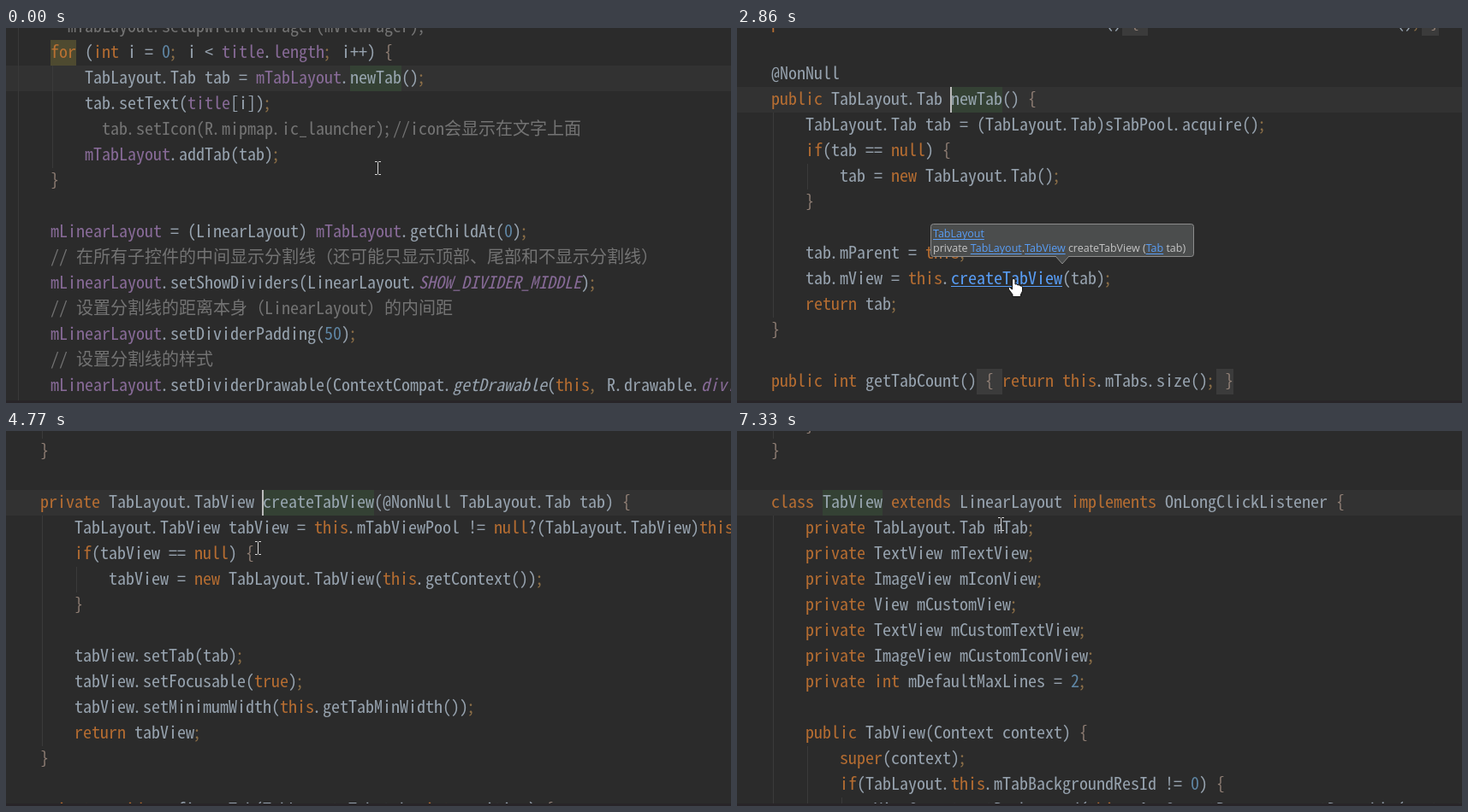
Animation of 847 by 439 pixels, one loop 7420 ms. Source, as an HTML page with a canvas:

```html
<!DOCTYPE html>
<html lang="en">
<head>
<meta charset="utf-8">
<title>Code walk</title>
<style>
html, body { margin: 0; width: 100%; height: 100%; overflow: hidden; background: #2b2b2b; }
canvas { display: block; }
</style>
</head>
<body>
<canvas id="stage" width="847" height="439"></canvas>
<script>
const W = 847, H = 439, LOOP = 7420, ROW = 30, COL = 10;
const g = document.getElementById('stage').getContext('2d');

const BG = '#2b2b2b', BAND = '#323232', MATCH = '#344134', TEXT = '#a9b7c6', LINK = '#589df6';
const MONO = '"Noto Sans Mono CJK SC", "Liberation Mono", monospace';
const CJK = '20px "Noto Sans Mono CJK SC", "Noto Sans CJK SC", sans-serif';
const UI = '12.5px "Open Sans", "Noto Sans", sans-serif';

// Font size whose character advance is one column
g.font = '100px ' + MONO;
const CODE = 100 * COL / g.measureText('0').width + 'px ' + MONO;

// A leading ~ marks a line that is commented out
const setup = `~  mTabLayout.setupWithViewPager(mViewPager);
for (int i = 0; i < title.length; i++) {
    TabLayout.Tab tab = mTabLayout.newTab();
    tab.setText(title[i]);
~      tab.setIcon(R.mipmap.ic_launcher);//icon会显示在文字上面
    mTabLayout.addTab(tab);
}

mLinearLayout = (LinearLayout) mTabLayout.getChildAt(0);
// 在所有子控件的中间显示分割线（还可能只显示顶部、尾部和不显示分割线）
mLinearLayout.setShowDividers(LinearLayout.SHOW_DIVIDER_MIDDLE);
// 设置分割线的距离本身（LinearLayout）的内间距
mLinearLayout.setDividerPadding(50);
// 设置分割线的样式
mLinearLayout.setDividerDrawable(ContextCompat.getDrawable(this, R.drawable.divider));`;

const newTab = `}

public void removeOnTabSelectedListener(@NonNull TabLayout.OnTabSelectedListener listener) {
    this.mSelectedListeners.remove(listener);
}

public void clearOnTabSelectedListeners() { this.mSelectedListeners.clear(); }

@NonNull
public TabLayout.Tab newTab() {
    TabLayout.Tab tab = (TabLayout.Tab)sTabPool.acquire();
    if(tab == null) {
        tab = new TabLayout.Tab();
    }

    tab.mParent = this;
    tab.mView = this.createTabView(tab);
    return tab;
}

public int getTabCount() { return this.mTabs.size(); }
`;

const createView = `private void updateAllTabs() {
    int i = 0;

    for(int z = this.mTabs.size(); i < z; ++i) {
        ((TabLayout.Tab)this.mTabs.get(i)).updateView();
    }

}

private TabLayout.TabView createTabView(@NonNull TabLayout.Tab tab) {
    TabLayout.TabView tabView = this.mTabViewPool != null?(TabLayout.TabView)this.mTabViewPool.acquire():null;
    if(tabView == null) {
        tabView = new TabLayout.TabView(this.getContext());
    }

    tabView.setTab(tab);
    tabView.setFocusable(true);
    tabView.setMinimumWidth(this.getTabMinWidth());
    return tabView;
}

private void configureTab(TabLayout.Tab tab, int position) {`;

const tabView = `    public void draw(Canvas canvas) {
        super.draw(canvas);
        if(this.mIndicatorLeft >= 0 && this.mIndicatorRight > this.mIndicatorLeft) {
            canvas.drawRect((float)this.mIndicatorLeft, (float)(this.getHeight() - this.mSelectedIndicatorHeight),
        }

    }
}

class TabView extends LinearLayout implements OnLongClickListener {
    private TabLayout.Tab mTab;
    private TextView mTextView;
    private ImageView mIconView;
    private View mCustomView;
    private TextView mCustomTextView;
    private ImageView mCustomIconView;
    private int mDefaultMaxLines = 2;

    public TabView(Context context) {
        super(context);
        if(TabLayout.this.mTabBackgroundResId != 0) {
            ViewCompat.setBackground(this, AppCompatResources.getDrawable(context, TabLayout.this.mTab));`;

// row/col: caret position; len: highlighted name; scroll: times of 90px wheel notches
const pages = [
  { from: 0, code: setup, x: 52, y: -1, row: 2, col: 35, len: 6, scroll: [], fields: true },
  { from: 990, code: newTab, x: 40, y: -6, row: 9, col: 21, len: 6, scroll: [1940, 2090] },
  { from: 3250, code: createView, x: 40, y: -6, row: 9, col: 26, len: 13, scroll: [4050, 4120] },
  { from: 5770, code: tabView, x: 40, y: -6, row: 9, col: 6, len: 7, scroll: [6300, 6420], matchFrom: 6300 },
];
for (const p of pages) {
  p.lines = p.code.split('\n');
  p.indents = p.lines.map(s => s.trim() ? s.replace('~', '').search(/\S/) : -1);
}

const links = [
  { on: [690, 990], row: 2, col: 35, name: 'newTab', bg: MATCH },
  { on: [2790, 3250], row: 16, col: 21, name: 'createTabView', bg: BG },
  { on: [4990, 5770], row: 9, col: 18, name: 'TabView', bg: BAND },
];

// *text* is a link
const tips = [
  { on: [2860, 3090], x: 226, y: 229, w: 308, lines: [
    '*TabLayout*', 'private *TabLayout*.*TabView* createTabView (*Tab* tab)'] },
  { on: [5050, 5770], x: 93, y: 2, w: 375, lines: [
    '[design-26.1.0] *android.support.design.widget.TabLayout*',
    'class *TabView* extends *LinearLayout*', 'implements *OnLongClickListener*'] },
];

// Pointer moves: start, end, x, y
const START = [434, 164];
const moves = [
  [160, 690, 432, 60], [1450, 1870, 482, 195], [2260, 2300, 478, 195], [2410, 2790, 324, 294],
  [3800, 3900, 370, 265], [4450, 4770, 294, 137], [4820, 4990, 258, 82], [6460, 6500, 308, 109],
];
const handOn = [[690, 990], [2790, 3330], [4990, 5600]];
const pointerOff = [[6550, 7330]];
const caretOff = [[0, 340], [840, 990], [1450, 1940], [2410, 2860], [4450, 4750],
  [5050, 5520], [6300, 6550], [7020, LOOP]];

const within = (t, [a, b]) => t >= a && t < b;
const any = (t, spans) => spans.some(s => within(t, s));

function rect(x, y, w, h, color) {
  g.fillStyle = color;
  g.fillRect(x, y, w, h);
}

function text(s, x, y, color, font) {
  g.font = font;
  g.fillStyle = color;
  g.fillText(s, x, y);
}

const keyword = /^(for|int|public|private|void|if|null|new|this|return|class|extends|implements|super|float|true)$/;

function tokenStyle(s, fields) {
  if (keyword.test(s)) return ['#cc7832'];
  if (/^\d+$/.test(s)) return ['#6897bb'];
  if (/[;,]/.test(s)) return ['#9c7a4c'];
  if (/[{}]/.test(s)) return ['#a08c80'];
  if (fields) {
    if (/^(SHOW_\w+|divider)$/.test(s)) return ['#9876aa', 'italic '];
    if (s === 'getDrawable') return [TEXT, 'italic '];
    if (/^(m[A-Z]\w*|title|length)$/.test(s)) return ['#9876aa'];
  }
  return [TEXT];
}

function drawLine(line, x, y, fields) {
  let dim = line[0] === '~', col = 0;
  // Softened to look like thin strokes
  g.globalAlpha = 0.85;
  for (const [s] of line.replace('~', '').matchAll(/[\u3000-\uffef]+|\w+|\s+|\/\/|\S/g)) {
    const wide = s > '\u3000';
    if (s === '//') dim = true;
    const [color, slant = ''] = dim ? ['#808080'] : tokenStyle(s, fields);
    // Points and commas sit at the left of their cell
    const nudge = /^[.,;]$/.test(s) ? -2 : 0;
    if (s.trim()) text(s, x + col * COL + nudge, y + 6, color, wide ? CJK : slant + CODE);
    col += s.length * (wide ? 2 : 1);
  }
  g.globalAlpha = 1;
}

function drawFolds(line, x, y) {
  const m = line.match(/^(.*\)) \{ .*; \}$/);
  if (!m) return;
  rect(x + m[1].length * COL, y - 15, 30, ROW, '#3b3b3b');
  rect(x + (line.length - 2) * COL, y - 15, 20, ROW, '#3b3b3b');
}

function drawPage(p, t) {
  const shift = 90 * p.scroll.filter(s => t >= s).length;
  const yOf = row => p.y + row * ROW - shift;
  const caretX = p.x + p.col * COL, caretY = yOf(p.row) - 15;

  rect(0, caretY, W, ROW, BAND);
  if (t >= (p.matchFrom || 0)) rect(caretX, caretY, p.len * COL, ROW, MATCH);
  if (p.fields) {
    rect(p.x, yOf(1) - 15, 30, ROW, '#4e4a30');
    rect(14, 0, 1, H, '#393939');
  }
  p.lines.forEach((line, i) => {
    const y = yOf(i);
    let depth = p.indents[i];
    if (depth < 0) depth = Math.max(p.indents[i - 1] ?? 0, p.indents[i + 1] ?? 0);
    for (let c = 0; c + 4 <= depth; c += 4) rect(p.x + c * COL + 2, y - 15, 1, ROW, '#3a3a3a');
    drawFolds(line, p.x, y);
    drawLine(line, p.x, y, p.fields);
  });
  for (const l of links) {
    if (!within(t, l.on)) continue;
    const x = p.x + l.col * COL, y = yOf(l.row), w = l.name.length * COL;
    rect(x, y - 14, w, 28, l.bg);
    text(l.name, x, y + 6, LINK, CODE);
    rect(x, y + 8, w, 1, LINK);
  }
  if (!any(t, caretOff)) rect(caretX - 1, caretY, 2, ROW, '#bbbbbb');
}

function drawTip({ x, y, w, lines }) {
  const h = 5 + 17 * lines.length, mid = x + w / 2;
  g.beginPath();
  g.roundRect(x + 0.5, y + 0.5, w - 1, h - 1, 3);
  g.fillStyle = '#4b4d4d';
  g.strokeStyle = '#8c8c8c';
  g.lineWidth = 1;
  g.fill();
  g.stroke();
  g.beginPath();
  g.moveTo(mid - 8, y + h - 1);
  g.lineTo(mid, y + h + 8);
  g.lineTo(mid + 8, y + h - 1);
  g.fill();
  g.stroke();
  lines.forEach((line, i) => {
    let tx = x + 3;
    const ty = y + 16 + 17 * i;
    line.split('*').forEach((s, k) => {
      text(s, tx, ty, k % 2 ? LINK : '#c4c4c4', UI);
      const tw = g.measureText(s).width;
      if (k % 2) rect(tx, ty + 2, tw, 1, LINK);
      tx += tw;
    });
  });
}

function pointer(t) {
  let [x, y] = START;
  for (const [a, b, nx, ny] of moves) {
    if (t < a) break;
    const u = Math.min(1, (Math.floor((t - a) / 75) + 1) * 75 / (b - a));
    const e = u * u * (3 - 2 * u);
    x += (nx - x) * e;
    y += (ny - y) * e;
  }
  return [Math.round(x), Math.round(y)];
}

const beam = new Path2D('M-3.5 -7.5H-1L0 -6.5L1 -7.5H3.5M0 -6.5V6.5M-3.5 7.5H-1L0 6.5L1 7.5H3.5');
const hand = new Path2D('M-2.5 1Q-2.5 -.5 -1 -.5Q1 -.5 1 1V6Q3 5 4 7Q6 6 7 8Q9.5 7 9.5 10' +
  'V14L7.5 18V20.5H-2V18L-6.5 12Q-7.5 9.5 -5.5 9.5L-2.5 12Z');

function drawPointer(t) {
  if (any(t, pointerOff)) return;
  const [x, y] = pointer(t);
  g.save();
  g.translate(x, y);
  g.lineWidth = 1;
  if (any(t, handOn)) {
    g.fillStyle = '#fff';
    g.strokeStyle = '#111';
    g.fill(hand);
    g.stroke(hand);
  } else {
    g.translate(0.5, 0);
    g.strokeStyle = '#d8d8d8';
    g.stroke(beam);
  }
  g.restore();
}

function draw(t) {
  rect(0, 0, W, H, BG);
  drawPage(pages.findLast(p => t >= p.from), t);
  rect(0, 436, W, 3, '#282528');
  tips.filter(p => within(t, p.on)).forEach(drawTip);
  drawPointer(t);
}

const start = performance.now();
function tick() {
  draw((performance.now() - start) % LOOP);
  requestAnimationFrame(tick);
}
tick();
</script>
</body>
</html>
```
